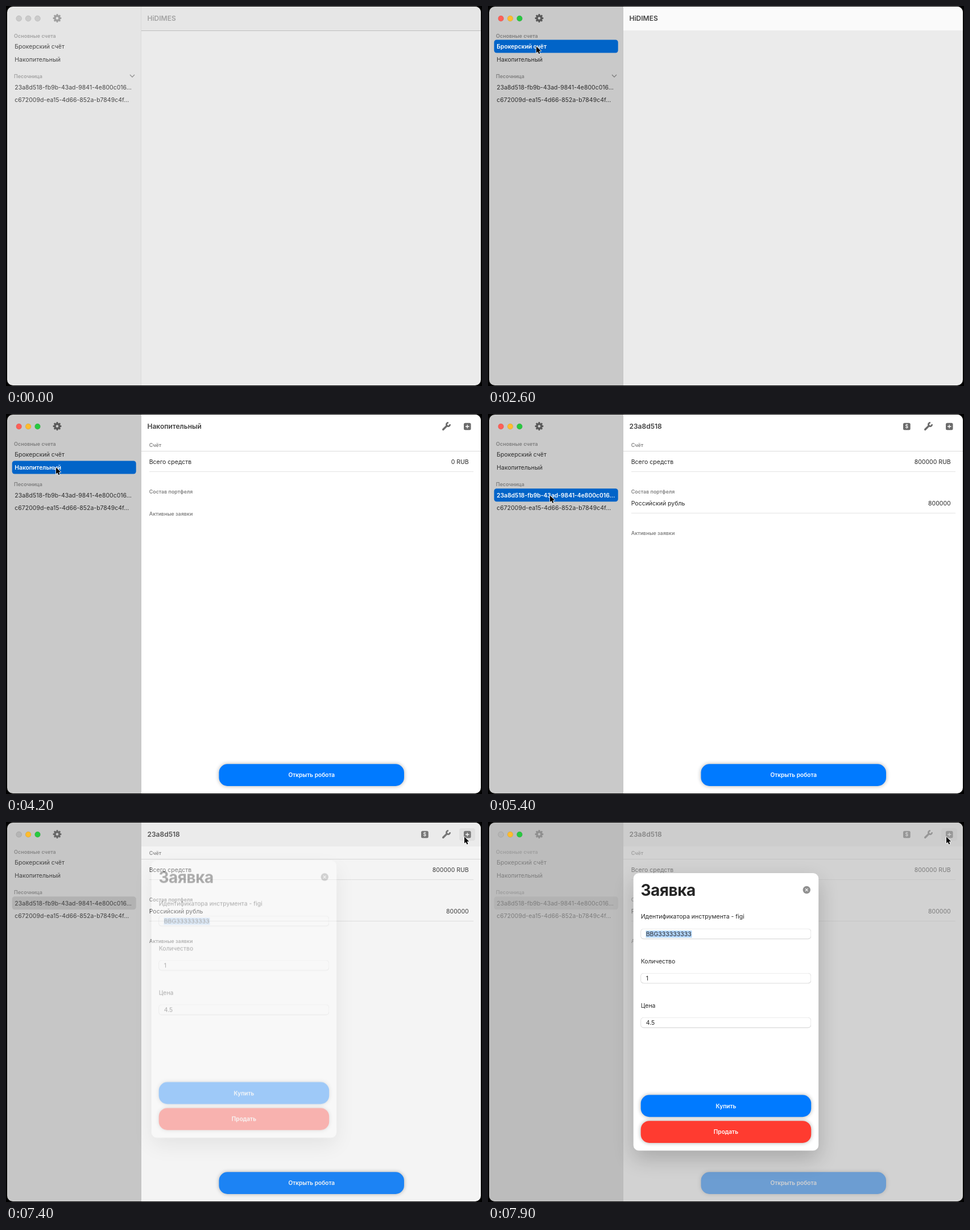
Recreate the animation shown at these times as an HTML page with a canvas. Size 837 by 669 pixels, loop 8000 ms.

```html
<!DOCTYPE html>
<html lang="ru">
<head>
<meta charset="utf-8">
<style>
html, body { margin: 0; width: 100%; height: 100%; overflow: hidden; background: #000; }
canvas { display: block; }
</style>
</head>
<body>
<canvas id="stage" width="837" height="669"></canvas>
<script>
const W = 837, H = 669, LOOP = 8000, STEP = 100;
const stage = document.getElementById('stage').getContext('2d');
const sheetLayer = document.createElement('canvas');
sheetLayer.width = W;
sheetLayer.height = H;
const BLUE = '#007aff', RED = '#ff3b30';

const ACTIVATE = 1800, SHEET = 7200;
const rows = [
  { y: 71, label: 'Брокерский счёт' },
  { y: 94, label: 'Накопительный' },
  { y: 142.8, label: '23a8d518-fb9b-43ad-9841-4e800c016…' },
  { y: 165.6, label: 'c672009d-ea15-4d66-852a-b7849c4f…' }
];
const selections = [[2500, 0], [3900, 1], [4800, 2]];
const pages = [
  [0, { title: 'HiDIMES' }],
  [2700, { title: 'Брокерский счёт', total: '0 RUB', rouble: '0' }],
  [4200, { title: 'Накопительный', total: '0 RUB' }],
  [5000, { title: '23a8d518', total: '800000 RUB', rouble: '800000', sandbox: true }]
];
const pointerPath = [
  [700, 17, 92], [1400, 72.5, 65.5], [1500, 72.5, 65.5], [1600, 74, 66.5],
  [2100, 74, 66.5], [2300, 85, 71], [3200, 85, 71], [3700, 88, 94],
  [4300, 88, 94], [4600, 106.5, 144.5], [5300, 106.5, 144.5], [5400, 109, 143.5],
  [5700, 109, 143.5], [6600, 805.5, 35], [6800, 806, 26]
];

const latest = (list, t) => {
  const hit = list.filter(item => item[0] <= t).pop();
  return hit ? hit[1] : null;
};
const smooth = p => p * p * (3 - 2 * p);

function box(c, x, y, w, h, r, fill) {
  c.beginPath();
  c.roundRect(x, y, w, h, r);
  c.fillStyle = fill;
  c.fill();
}

function disc(c, x, y, r, fill) {
  c.beginPath();
  c.arc(x, y, r, 0, Math.PI * 2);
  c.fillStyle = fill;
  c.fill();
}

function line(c, points, color, width = 1) {
  c.beginPath();
  points.forEach(([x, y]) => c.lineTo(x, y));
  c.strokeStyle = color;
  c.lineWidth = width;
  c.stroke();
}

// y is the middle of the capital letters
function text(c, str, x, y, { size = 10.5, weight = 400, color = '#262626', align = 'left', spacing = 0 } = {}) {
  c.font = `${weight} ${size}px Inter, "Noto Sans", sans-serif`;
  c.letterSpacing = spacing + 'px';
  c.textAlign = align;
  c.fillStyle = color;
  c.fillText(str, x, y + size * 0.364);
}

function button(c, label, x, y, w, h, fill) {
  c.save();
  c.shadowColor = 'rgba(0,0,0,.33)';
  c.shadowBlur = 7;
  box(c, x, y, w, h, 15, fill);
  c.restore();
  text(c, label, x + w / 2, y + h / 2, { size: 10.1, weight: 600, color: '#fff', align: 'center' });
}

function gear(c, x, y, color) {
  c.save();
  c.translate(x, y);
  for (let i = 0; i < 8; i++) {
    c.rotate(Math.PI / 4);
    box(c, -1.5, -7.4, 3, 4, 0.8, color);
  }
  c.beginPath();
  c.arc(0, 0, 4, 0, Math.PI * 2);
  c.strokeStyle = color;
  c.lineWidth = 3.4;
  c.stroke();
  c.restore();
}

function wrench(c, x, y, color) {
  c.save();
  c.translate(x, y);
  c.rotate(Math.PI / 4);
  c.lineCap = 'round';
  line(c, [[0, -2], [0, 7.5]], color, 3.4);
  c.lineCap = 'butt';
  c.beginPath();
  c.arc(0, -5, 3.1, -0.9, Math.PI + 0.9);
  c.lineWidth = 2.8;
  c.stroke();
  c.restore();
}

function plusIcon(c, color) {
  box(c, 805, 15.7, 12.5, 12.5, 2.5, color);
  line(c, [[811.2, 18.7], [811.2, 25.2]], '#fff', 1.3);
  line(c, [[808, 22], [814.5, 22]], '#fff', 1.3);
}

function dollarIcon(c, color) {
  box(c, 730, 15.7, 12.7, 12.5, 2.5, color);
  text(c, '$', 736.3, 22, { size: 8.5, weight: 600, color: '#fff', align: 'center' });
}

function sidebar(c, t, active, modal) {
  c.fillStyle = active ? '#c9c9c9' : '#e5e5e5';
  c.fillRect(0, 0, 238, H);
  c.fillStyle = active ? '#c5c5c5' : '#dadada';
  c.fillRect(237, 0, 1, H);
  gear(c, 90, 21.5, active ? '#595959' : '#a0a0a0');

  const heading = { size: 9, weight: 600, color: active ? '#7e7e7e' : '#a3a3a3' };
  text(c, 'Основные счета', 14, 52.3, heading);
  text(c, 'Песочница', 14, 124, heading);
  if (t < 2700 || (t >= 4500 && t < 4900)) {
    line(c, [[218, 121], [222, 125.2], [226, 121]], active ? '#777' : '#8c8c8c', 1.2);
  }

  const chosen = latest(selections, t);
  rows.forEach(({ y, label }, i) => {
    const on = i === chosen;
    if (on) box(c, 10.7, y - 11.5, 218, 23, 4.5, modal ? '#b1b1b1' : '#0164c8');
    const bright = on && !modal;
    text(c, label, 15.3, y, bright
      ? { size: 10.3, weight: 600, color: '#fff' }
      : { color: active ? '#2c2c2c' : '#484848' });
  });
}

function lights(c, active, modal) {
  const colors = active ? [modal ? '#b5b5b5' : '#ff5f57', '#febc2e', '#28c840'] : Array(3).fill('#cbcbcb');
  colors.forEach((color, i) => {
    const x = 22.7 + i * 16.4;
    disc(c, x, 22, 4.9, color);
    c.strokeStyle = 'rgba(0,0,0,.13)';
    c.lineWidth = 0.7;
    c.stroke();
  });
}

function content(c, page, active, modal) {
  const loaded = page.total !== undefined;
  c.fillStyle = loaded ? '#fff' : '#ebebeb';
  c.fillRect(238, 0, W, H);
  c.fillStyle = !active ? '#e6e6e6' : modal ? '#f4f4f4' : loaded ? '#fff' : '#fafafa';
  c.fillRect(238, 0, W, 43);
  if (!active) line(c, [[238, 43.5], [W, 43.5]], '#bdbdbd');
  text(c, page.title, 248.5, 22, { size: 12, weight: 600, color: active ? '#414141' : '#a2a2a2' });
  if (!loaded) return;

  const icon = '#6b6b6b';
  if (modal) box(c, 797, 11, 28, 22, 4, '#e7e7e7');
  if (page.sandbox) dollarIcon(c, icon);
  wrench(c, 774, 22, icon);
  plusIcon(c, icon);

  const heading = { size: 8.9, weight: 600, color: '#828282' };
  const right = { align: 'right' };
  text(c, 'Счёт', 251.7, 55, heading);
  line(c, [[238, 65.5], [W, 65.5]], '#dcdcdc');
  text(c, 'Всего средств', 251.7, 84.3);
  text(c, page.total, 813.7, 84.3, right);
  line(c, [[252, 101.5], [822, 101.5]], '#e4e4e4');
  text(c, 'Состав портфеля', 251.7, 136.3, heading);
  if (page.rouble) {
    text(c, 'Российский рубль', 251.7, 157.6);
    text(c, page.rouble, 813.7, 157.6, right);
    line(c, [[252, 174.5], [822, 174.5]], '#e4e4e4');
  }
  text(c, 'Активные заявки', 251.7, page.rouble ? 209.5 : 175.3, heading);
  button(c, 'Открыть робота', 374.5, 616.3, 325.5, 38.7, BLUE);
}

function field(c, label, value, y, marked) {
  text(c, label, 268.7, y);
  box(c, 268.5, y + 21.5, 299.5, 18.1, 5, '#c6c6c6');
  box(c, 268.5, y + 21.2, 299.5, 17.6, 5, '#e6e6e6');
  box(c, 269.2, y + 22, 298.1, 16.7, 4.5, '#fff');
  if (marked) {
    c.fillStyle = '#b3d7ff';
    c.fillRect(277.5, y + 24.5, 81, 12.5);
  }
  text(c, value, 277.7, y + 30.8);
}

function paintSheet(c) {
  c.clearRect(0, 0, W, H);
  c.save();
  c.shadowColor = 'rgba(0,0,0,.2)';
  c.shadowBlur = 36;
  c.shadowOffsetY = 14;
  box(c, 255.7, 90, 325.5, 488.5, 9.5, '#fff');
  c.restore();
  text(c, 'Заявка', 268.5, 120, { size: 28, weight: 700, spacing: -0.5 });
  disc(c, 560.3, 119.5, 6.7, '#919191');
  line(c, [[558, 117.2], [562.6, 121.8]], '#fff', 1.1);
  line(c, [[562.6, 117.2], [558, 121.8]], '#fff', 1.1);
  field(c, 'Идентификатора инструмента - figi', 'BBG333333333', 166.6, true);
  field(c, 'Количество', '1', 244.7);
  field(c, 'Цена', '4.5', 322.8);
  button(c, 'Купить', 268.7, 480.5, 299.5, 38.7, BLUE);
  button(c, 'Продать', 268.7, 526.2, 299.5, 38.7, RED);
}

function pointer(c, t) {
  const next = pointerPath.findIndex(k => k[0] > t);
  if (next === 0) return;
  const b = pointerPath[next < 0 ? pointerPath.length - 1 : next];
  const a = next < 0 ? b : pointerPath[next - 1];
  const p = next < 0 ? 0 : smooth((t - a[0]) / (b[0] - a[0]));
  const x = a[1] + (b[1] - a[1]) * p, y = a[2] + (b[2] - a[2]) * p;
  const shape = [[0, 0], [0, 11.6], [2.6, 9.2], [4.5, 13.4], [6.4, 12.6], [4.6, 8.5], [8.2, 8.3]];
  c.beginPath();
  shape.forEach(([dx, dy]) => c.lineTo(x + dx, y + dy));
  c.closePath();
  c.lineJoin = 'round';
  c.strokeStyle = '#fff';
  c.lineWidth = 1.6;
  c.stroke();
  c.fillStyle = '#000';
  c.fill();
}

function draw(t) {
  const c = stage;
  const active = t >= ACTIVATE, modal = t >= SHEET;
  c.fillStyle = '#000';
  c.fillRect(0, 0, W, H);
  c.save();
  c.beginPath();
  c.roundRect(2, 1, 833, 667, 10);
  c.clip();
  content(c, latest(pages, t), active, modal);
  sidebar(c, t, active, modal);

  // the sheet fades in while it slides down
  const p = Math.min(1, Math.max(0, (t - SHEET) / 500));
  const shown = smooth(p);
  c.fillStyle = `rgba(180,180,180,${0.6 * Math.pow(shown, 1.3)})`;
  c.fillRect(0, 0, W, H);
  lights(c, active, modal);
  c.globalAlpha = shown;
  if (shown > 0) c.drawImage(sheetLayer, 0, -35 * (1 - shown));
  c.restore();
  pointer(c, t);
}

const start = performance.now();
paintSheet(sheetLayer.getContext('2d'));

function tick() {
  const t = (performance.now() - start) % LOOP;
  draw(Math.floor(t / STEP) * STEP);
  requestAnimationFrame(tick);
}
tick();
</script>
</body>
</html>
```
